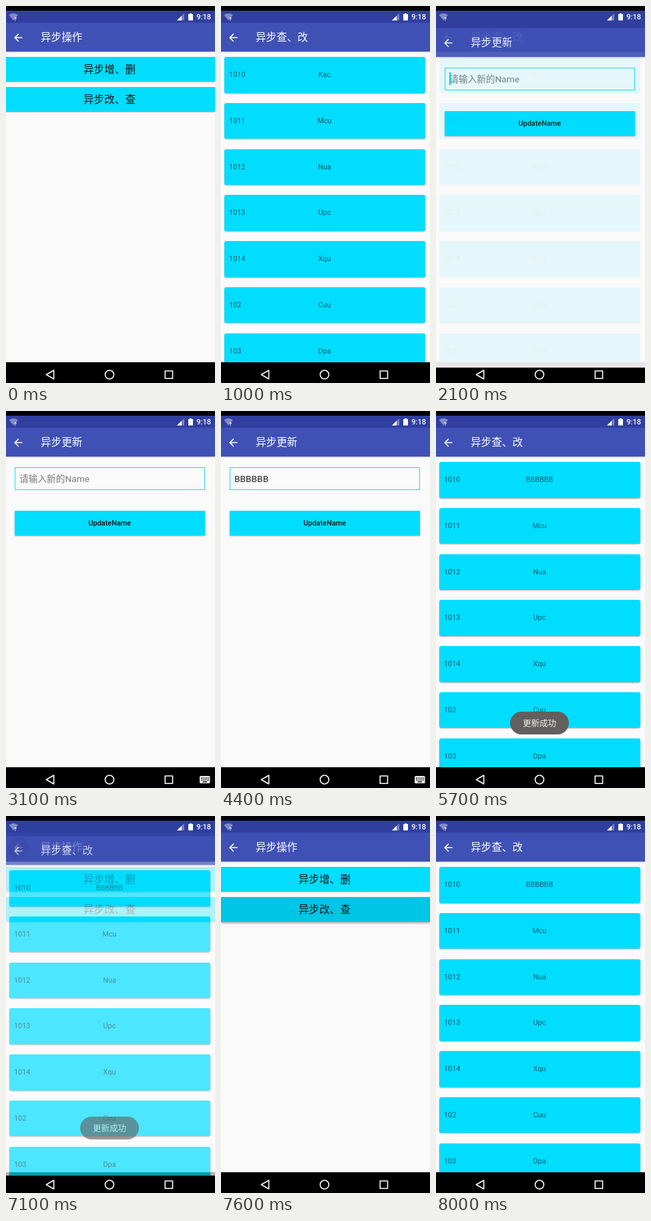
An HTML page for the animation above (9 s loop, 313 by 563 pixels).

```html
<!DOCTYPE html>
<html lang="zh-CN">
<head>
<meta charset="utf-8">
<title>异步操作</title>
<style>
  html, body { margin: 0; width: 100%; height: 100%; overflow: hidden; background: #000; }
  body { position: relative; font-family: Roboto, "Noto Sans CJK SC", "Noto Sans CJK", sans-serif; }
  body * { box-sizing: border-box; }
  #stage { position: absolute; left: 0; top: 0; width: 313px; height: 563px; overflow: hidden; }

  /* every screen is one window: status strip, header, content, navigation strip */
  .win {
    position: absolute; inset: 0;
    background: linear-gradient(transparent 7px, #303f9f 0 25.5px, #3f51b5 0 68.5px, #fafafa 0 532px, #000 0);
  }
  .win h1 {
    position: absolute; left: 52px; top: 26px; margin: 0;
    font-size: 15.6px; font-weight: 400; line-height: 43px; color: #fff; white-space: nowrap;
  }
  .back { position: absolute; left: 9.4px; top: 37.7px; width: 18.7px; height: 18.7px; fill: #fff; }
  .content {
    position: absolute; left: 0; top: 68px; width: 313px; height: 464px; overflow: hidden;
    box-shadow: inset 0 3px 2px -2px rgba(0, 0, 0, .25);
  }
  .content > * { position: absolute; white-space: nowrap; }

  /* menu */
  .item {
    left: 0; width: 313px; height: 37px; padding-right: 3px;
    background: #0df; box-shadow: 0 1px 1px rgba(0, 0, 0, .2);
    font-size: 15.6px; line-height: 39px; text-align: center; color: #111;
  }

  /* list */
  .card {
    left: 5px; top: calc(8px + 68.75px * var(--i)); width: 300.5px; height: 53.5px;
    border-radius: 3px; background: #0df; box-shadow: 0 1px 2px rgba(0, 0, 0, .35);
    font-size: 10.9px; line-height: 54px; color: rgba(0, 0, 0, .58);
  }
  .card span { position: absolute; left: 0; width: 300px; text-align: center; }
  .card b { position: absolute; left: 7px; font-weight: 400; }

  /* form */
  .field { left: 12.5px; top: 16px; width: 285.5px; height: 34px; border: 1px solid #2ad4ee; }
  .hint, .typed { left: 20px; top: 16px; height: 34px; font-size: 13.7px; line-height: 34px; }
  .hint { color: #7a7a7a; }
  .typed { overflow: hidden; color: #222; }
  .caret { top: 23px; height: 19px; background: #00cfee; }
  .send {
    left: 12.5px; top: 80.5px; width: 285.5px; height: 37.5px;
    background: #0df; box-shadow: 0 1px 2px rgba(0, 0, 0, .3);
    font-size: 10.9px; font-weight: 500; line-height: 38px; text-align: center; color: #111;
  }

  .toast {
    position: absolute; left: 111px; top: 449px; width: 88px; height: 34px; border-radius: 17px;
    background: #625f5e; color: #f2f2f2; font-size: 12.5px; line-height: 35px; text-align: center;
  }
  .ripple {
    position: absolute; left: 2px; top: 31px; width: 33px; height: 33px;
    border-radius: 50%; background: rgba(0, 0, 0, .08);
  }
  .bars { position: absolute; inset: 0; }
  .clock { font: 500 11px Roboto, sans-serif; fill: #fff; }

  /* one shared 9 s clock; each 100 ms is 1.111 % */
  .list, .form, .toast, .ripple, .press, .send, .hint, .typed, .caret, .old, .new, .keys {
    animation: 9s step-end infinite;
  }
  .list { animation-name: list; }
  .form { animation-name: form; }
  .toast { animation-name: toast; }
  .ripple { animation-name: ripple; }
  .press { animation-name: press; }
  .send { animation-name: send; }
  .hint { animation-name: hint; }
  .typed { animation-name: type; }
  .caret { animation-name: caret; }
  .old { animation-name: old; }
  .new { animation-name: new; }
  .keys { animation-name: keys; }

  @keyframes list {
    0% { opacity: 0; transform: none; }
    8.88% { opacity: .67; transform: translateY(20px); }
    9.99% { opacity: 1; transform: translateY(3px); }
    11.11%, 77.77% { opacity: 1; transform: none; }
    78.88% { opacity: .7; transform: translateY(5px); }
    79.99% { opacity: 0; transform: none; }
    86.66% { opacity: .79; transform: translateY(15px); }
    87.77% { opacity: 1; transform: translateY(2px); }
    88.88%, 100% { opacity: 1; transform: none; }
  }
  @keyframes form {
    0% { opacity: 0; transform: none; }
    23.33% { opacity: .92; transform: translateY(8px); }
    24.44% { opacity: 1; transform: translateY(1px); }
    25.55% { opacity: 1; transform: none; }
    59.99% { opacity: .91; transform: translateY(2px); }
    61.11% { opacity: .25; transform: translateY(22px); }
    62.22%, 100% { opacity: 0; transform: none; }
  }
  @keyframes toast {
    0% { opacity: 0; }
    58.88% { opacity: .3; }
    59.99% { opacity: .6; }
    61.11% { opacity: .82; }
    62.22% { opacity: .95; }
    63.33% { opacity: 1; }
    77.77% { opacity: .9; }
    78.88% { opacity: .62; }
    79.99% { opacity: .25; }
    81.11%, 100% { opacity: 0; }
  }
  @keyframes ripple {
    0% { opacity: 0; }
    76.66% { opacity: 1; }
    78.88% { opacity: .7; }
    79.99% { opacity: .3; }
    81.11%, 100% { opacity: 0; }
  }
  @keyframes press {
    0%, 11.11% { background: #0df; box-shadow: 0 1px 1px rgba(0, 0, 0, .2); }
    6.66%, 84.44% { background: #00c6e5; box-shadow: 0 2px 3px rgba(0, 0, 0, .35); }
    88.88%, 100% { background: #0df; box-shadow: 0 1px 1px rgba(0, 0, 0, .2); }
  }
  @keyframes send {
    0% { background: #0df; box-shadow: 0 1px 2px rgba(0, 0, 0, .3); }
    55.55% { background: #00d0f0; box-shadow: 0 2px 3px rgba(0, 0, 0, .3); }
    56.66% { background: #00c6e5; box-shadow: 0 2px 3px rgba(0, 0, 0, .35); }
    62.22%, 100% { background: #0df; box-shadow: 0 1px 2px rgba(0, 0, 0, .3); }
  }
  @keyframes hint {
    0% { opacity: 1; }
    37.77%, 100% { opacity: 0; }
  }
  @keyframes type {
    0% { width: 0; }
    37.77% { width: 8.5px; }
    39.99% { width: 17px; }
    41.11% { width: 25.6px; }
    42.22% { width: 34.1px; }
    43.33% { width: 42.6px; }
    44.44%, 100% { width: 60px; }
  }
  @keyframes caret {
    0% { opacity: 1; left: 20px; width: 2px; }
    26.66% { opacity: 0; left: 20px; width: 2px; }
    29.99% { opacity: 1; left: 20px; width: 2px; }
    34.44% { opacity: 0; left: 20px; width: 2px; }
    37.77% { opacity: 1; left: 28px; width: 1px; }
    39.99% { opacity: 1; left: 37px; width: 1px; }
    41.11% { opacity: 1; left: 45px; width: 1px; }
    42.22% { opacity: 1; left: 54px; width: 1px; }
    43.33% { opacity: 1; left: 62px; width: 1px; }
    44.44%, 52.22% { opacity: 1; left: 71px; width: 1px; }
    48.88% { opacity: 0; left: 71px; width: 1px; }
    56.66%, 100% { opacity: 0; left: 71px; width: 1px; }
  }
  @keyframes old {
    0% { opacity: 1; }
    58.88%, 100% { opacity: 0; }
  }
  @keyframes new {
    0% { opacity: 0; }
    58.88%, 100% { opacity: 1; }
  }
  @keyframes keys {
    0% { opacity: 0; }
    29.99% { opacity: 1; }
    58.88%, 100% { opacity: 0; }
  }
</style>
</head>
<body>
<svg width="0" height="0" style="position:absolute">
  <symbol id="arrow" viewBox="0 0 24 24">
    <path d="M20 11H7.83l5.59-5.59L12 4l-8 8 8 8 1.41-1.41L7.83 13H20z"/>
  </symbol>
</svg>

<div id="stage">
  <section class="win home">
    <svg class="back"><use href="#arrow"/></svg>
    <h1>异步操作</h1>
    <div class="content">
      <div class="item" style="top:8px">异步增、删</div>
      <div class="item press" style="top:52.5px">异步改、查</div>
    </div>
  </section>

  <section class="win list">
    <svg class="back"><use href="#arrow"/></svg>
    <h1>异步查、改</h1>
    <div class="content">
      <div class="card" style="--i:0"><b>1010</b><span class="old">Kac</span><span class="new">BBBBBB</span></div>
      <div class="card" style="--i:1"><b>1011</b><span>Mcu</span></div>
      <div class="card" style="--i:2"><b>1012</b><span>Nua</span></div>
      <div class="card" style="--i:3"><b>1013</b><span>Upc</span></div>
      <div class="card" style="--i:4"><b>1014</b><span>Xqu</span></div>
      <div class="card" style="--i:5"><b>102</b><span>Cuu</span></div>
      <div class="card" style="--i:6"><b>103</b><span>Dpa</span></div>
    </div>
  </section>

  <section class="win form">
    <svg class="back"><use href="#arrow"/></svg>
    <h1>异步更新</h1>
    <div class="content">
      <div class="field"></div>
      <div class="hint">请输入新的Name</div>
      <div class="typed">BBBBBB</div>
      <div class="caret"></div>
      <div class="send">UpdateName</div>
    </div>
  </section>

  <div class="ripple"></div>
  <div class="toast">更新成功</div>

  <svg class="bars" width="313" height="563" viewBox="0 0 313 563">
    <!-- status bar -->
    <path d="M4.5 13.4Q11.3 8.6 18 13.4L11.3 21.5Z" fill="#fff" opacity=".4"/>
    <text x="12" y="21.5" font-family="Roboto, sans-serif" font-size="8" font-weight="700" fill="#fff">?</text>
    <path d="M267 11V21.5H256Z" fill="#fff" opacity=".35"/>
    <path d="M263 14.8V21.5H256Z" fill="#fff"/>
    <path d="M275 11h3v1h2v9.5h-7V12h2z" fill="#fff"/>
    <text class="clock" x="285.3" y="20.3">9:18</text>

    <!-- navigation bar -->
    <g fill="none" stroke="#fff" stroke-width="1.6" stroke-linejoin="round">
      <path d="M60.3 550.5L71.6 544V557Z"/>
      <circle cx="155" cy="550.5" r="6.5"/>
      <rect x="238.3" y="545" width="11.2" height="11.2"/>
    </g>
    <g class="keys">
      <rect x="290" y="545" width="15.5" height="11" rx="1.5" fill="#eee"/>
      <path d="M292 548.2H304M292 551H304" stroke="#000" stroke-width="1.5" stroke-dasharray="1.5 1.1"/>
      <path d="M294.5 553.8H301" stroke="#000" stroke-width="1.4"/>
    </g>
  </svg>
</div>
</body>
</html>
```
